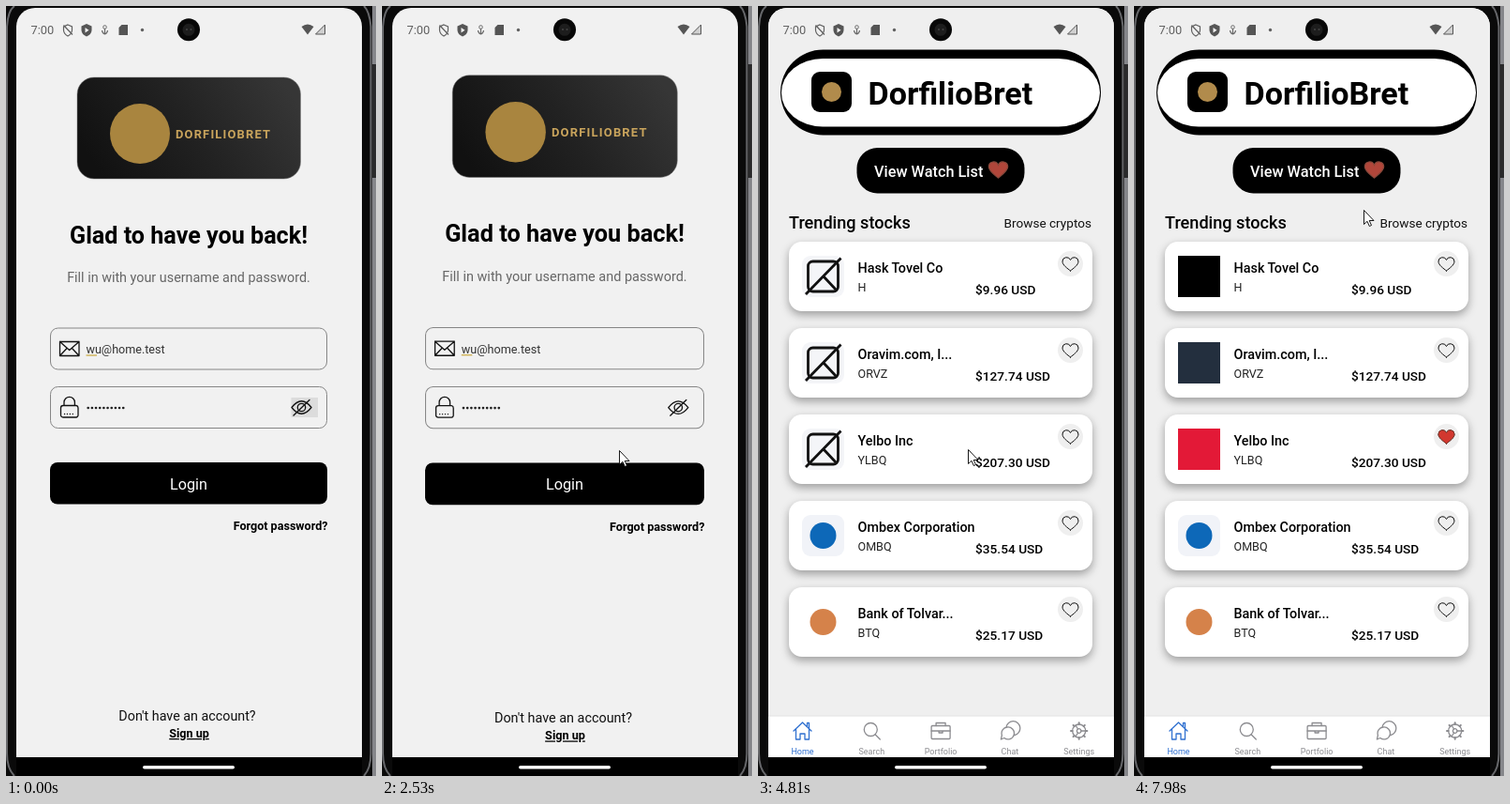
Write an HTML page that moves like this. It is 395 by 820 pixels and loops after 8000 ms.

```html
<!DOCTYPE html>
<html lang="en">
<head>
<meta charset="utf-8">
<style>
html, body { margin: 0; width: 100%; height: 100%; overflow: hidden; background: #0a0a0a; }
svg { display: block; font-family: Roboto, sans-serif; }
.line { fill: none; stroke: #111; stroke-width: 1.3; stroke-linecap: round; stroke-linejoin: round; }
.tab { fill: none; stroke-width: 1.3; stroke-linejoin: round; stroke-linecap: round; }
.card { fill: #fff; filter: drop-shadow(0 4px 5px rgba(0,0,0,.34)); }
</style>
</head>
<body>
<svg id="stage" width="395" height="820" viewBox="0 0 395 820"></svg>
<script>
const text = (x, y, size, str, attrs = '') =>
  `<text x="${x}" y="${y}" font-size="${size}" ${attrs}>${str}</text>`;
const rect = (x, y, w, h, r, fill, attrs = '') =>
  `<rect x="${x}" y="${y}" width="${w}" height="${h}" rx="${r}" fill="${fill}" ${attrs}/>`;
const circle = (x, y, r, fill, attrs = '') =>
  `<circle cx="${x}" cy="${y}" r="${r}" fill="${fill}" ${attrs}/>`;
const path = (d, attrs = 'class="line"') => `<path d="${d}" ${attrs}/>`;
const heart = (x, y, scale, attrs) =>
  path('M0 7C-3 4.5-8.5 1-8.5-3A4.4 4.4 0 0 1 0-4.5A4.4 4.4 0 0 1 8.5-3C8.5 1 3 4.5 0 7Z',
    `transform="translate(${x} ${y}) scale(${scale})" ${attrs}`);
const MIDDLE = 'text-anchor="middle"', END = 'text-anchor="end"';
const BOLD = 'font-weight="700"', MEDIUM = 'font-weight="500"';

const login = `
  ${rect(-20, -20, 440, 860, 0, '#f1f1f1')}
  ${rect(76, 76, 238.5, 108, 18, 'url(#metal)', 'stroke="#777" stroke-width=".5"')}
  ${circle(143, 136, 32, '#a9853f')}
  ${text(181, 140.5, 12.9, 'DORFILIOBRET', `${BOLD} fill="#c9a45c" letter-spacing="1.2"`)}
  ${text(195, 252.5, 25.14, 'Glad to have you back!', `${BOLD} ${MIDDLE}`)}
  ${text(195, 293.5, 14.37, 'Fill in with your username and password.', `${MIDDLE} fill="#666"`)}
  ${rect(47.5, 343, 295, 44, 8, 'none', 'stroke="#868686"')}
  ${rect(47.5, 405.5, 295, 44, 8, 'none', 'stroke="#868686"')}
  ${path('M57.5 357.5H78V372.5H57.5ZL67.7 366.5 78 357.5M57.5 372.5L65 364.5M78 372.5L70.5 364.5')}
  ${text(85.5, 370, 12.57, 'wu@home.test', 'fill="#333"')}
  ${path('M85.5 372H97', 'stroke="#c8a73c" stroke-width="1.2"')}
  ${path('M62 425V422A5.7 5.7 0 0 1 73.4 422V425M61 425.5H75A2.5 2.5 0 0 1 77 428V435A2.5 2.5 0 0 1 75 438H61A2.5 2.5 0 0 1 58.5 435V428A2.5 2.5 0 0 1 61 425.5Z')}
  ${path('M62.5 434.5H74', 'class="line" stroke-dasharray=".1 2.8"')}
  ${Array.from({ length: 10 }, (_, i) => circle(87.7 + i * 4.17, 428, 1.35, '#222')).join('')}
  ${rect(304.5, 417, 28.5, 21, 0, '#dcdcdc', 'id="focus"')}
  ${path('M305 427.5Q315.5 414 326 427.5Q315.5 441 305 427.5ZM307 436L324 419.5')}
  ${circle(315.5, 427.5, 4.2, 'none', 'class="line"')}
  <g id="button">${rect(47, 486, 296, 44.5, 8, '#000')}
  ${text(195, 514.5, 16.16, 'Login', `${MIDDLE} fill="#fff"`)}</g>
  ${text(343.5, 558, 12.57, 'Forgot password?', `${BOLD} ${END}`)}
  ${text(193.5, 761, 14.3, 'Don\'t have an account?', `${MIDDLE} fill="#111"`)}
  ${text(195.5, 779, 12.57, 'Sign up', `${BOLD} ${MIDDLE} text-decoration="underline"`)}`;

// name, ticker, price, logo background, logo dot
const stocks = [
  ['Hask Tovel Co', 'H', 9.96, '#000'],
  ['Oravim.com, I...', 'ORVZ', 127.74, '#232f3e'],
  ['Yelbo Inc', 'YLBQ', 207.3, '#e31937'],
  ['Ombex Corporation', 'OMBQ', 35.54, '#f1f3f8', '#0d68b8'],
  ['Bank of Tolvar...', 'BTQ', 25.17, '#fff', '#d5824a'],
];
const placeholder = rect(47, 266, 45, 44, 9, '#f4f5f8') +
  rect(53.5, 272, 32, 32, 5, 'none', 'stroke="#111" stroke-width="2.8"') +
  path('M51 307L88.5 268.5M70 288L84 303', 'fill="none" stroke="#111" stroke-width="2.8"');

const stockCard = ([name, ticker, price, back, dot], i) => `
  <g transform="translate(0 ${i * 92})">
  ${rect(33, 251, 324, 74, 14, '#fff', 'class="card"')}
  <g class="early">${dot ? rect(47, 266, 45, 44, 9, back) + circle(69.5, 288, 14, dot) : placeholder}</g>
  ${dot ? '' : rect(47, 266, 45, 44, 0, back, 'class="late"')}
  ${text(106.5, 283.5, 14.37, name, MEDIUM)}
  ${text(106.5, 304, 12.57, ticker, 'fill="#222"')}
  ${text(232, 307, 13.7, `$${price.toFixed(2)} USD`, MEDIUM)}
  ${circle(333.5, 274.5, 13.5, '#efefef')}
  ${heart(333.5, 275, 1, 'class="line" style="stroke-width:1"')}
  ${i === 2 ? `<g id="liked">${heart(333.5, 275, 1, 'fill="#d2382f" stroke="#86382c"')}</g>` : ''}
  </g>`;

const gearTeeth = Array.from({ length: 8 }, (_, i) =>
  `<path d="M0-7V-8.7" transform="rotate(${i * 45})" stroke-width="2"/>`).join('');
const tabs = [
  ['Home', '<path d="M-9.5 0L0-9 9.5 0M-7-2V9H-2.5V3H2.5V9H7V-2M5-5V-8.5H7V-3"/>'],
  ['Search', '<circle cx="-1" cy="-1.5" r="7"/><path d="M4 4L9 9"/>'],
  ['Portfolio', '<rect x="-10" y="-5.5" width="20" height="14" rx="1"/><path d="M-10 0H10M-5-5.5V-8.5H5V-5.5M-2 0V2H2V0"/>'],
  ['Chat', '<path d="M-4-4A7.5 7.5 0 1 1 5 4.5M-3-4A6.5 6.5 0 1 1-6 7.5L-9.5 9-8.5 4.5A6.5 6.5 0 0 1-3-4"/>'],
  ['Settings', `<circle r="7"/><circle r="2.3"/><path d="M2.3 0H7M-1.2 2L-3.5 6M-1.2-2L-3.5-6"/>${gearTeeth}`],
];
const tabItem = ([label, icon], i) => {
  const color = i ? '#8c8c90' : '#2f70d0', x = 47.5 + i * 73.8;
  return `<g class="tab" stroke="${color}" transform="translate(${x} 772)">${icon}</g>` +
    text(x, 797, 9, label, `${MIDDLE} fill="${color}"`);
};

const home = `
  ${rect(11, 2, 369, 798, 0, '#efefef')}
  ${rect(24, 46.5, 342, 91, 45.5, '#000')}
  ${rect(25, 56, 340, 72.5, 44, '#fff', 'ry="36"')}
  ${rect(57, 70, 43, 43, 9, '#000')}
  ${circle(78.5, 91.5, 10.5, '#b18b4c')}
  ${text(117.5, 105, 34.1, 'DorfilioBret', BOLD)}
  ${rect(105.5, 151, 179, 48.5, 22, '#000')}
  ${text(124, 181.5, 16.3, 'View Watch List', `fill="#fff" ${MEDIUM}`)}
  ${heart(256.5, 174.7, 1.2, 'fill="#b0463a" stroke="#86483a"')}
  ${text(33, 236.5, 18.1, 'Trending stocks', MEDIUM)}
  ${text(262.5, 235.5, 13.6, 'Browse cryptos', 'fill="#111"')}
  <path id="spinner" fill="none" stroke="#111" stroke-width="2.6"/>
  <g id="list">${stocks.map(stockCard).join('')}</g>
  ${rect(11, 756, 369, 44, 0, '#fff')}
  ${path('M11 756H380', 'stroke="#e2e2e2"')}
  ${tabs.map(tabItem).join('')}`;

const statusBar = `
  ${text(26.5, 30, 12.8, '7:00', 'fill="#606060"')}
  ${path('M66 20L70.5 22V26Q70 30 66 32Q62 30 61.5 26V22ZM61.5 20.5L71 30.5', 'fill="none" stroke="#606060" stroke-width="1.2"')}
  ${path('M86 19L91.5 21.5V26Q91 30.5 86 32.5Q81 30.5 80.5 26V21.5Z', 'fill="#555"')}
  ${path('M84.5 23L88.5 25.7 84.5 28.5Z', 'fill="#f1f1f1"')}
  ${circle(105.5, 22.5, 1.8, 'none', 'stroke="#666"')}
  ${path('M105.5 24V30M102.5 26Q103 29.5 105.5 30Q108 29.5 108.5 26', 'fill="none" stroke="#666" stroke-width="1.2"')}
  ${path('M123.5 20H130V31H120.5V23Z', 'fill="#555"')}
  ${circle(145.5, 25.5, 1.7, '#606060')}
  ${path('M315.5 22Q322 17 328.5 22L322 30.5Z', 'fill="#555"')}
  ${path('M330.5 30L340.5 20V30Z', 'fill="#d0d0d0" stroke="#555"')}
  ${circle(195, 25.3, 12, '#080808')}${circle(195, 25.3, 6.5, '#1d1d1d')}
  ${circle(193, 25, 1, '#444')}${circle(197.5, 25, 1, '#444')}`;

const $ = id => document.getElementById(id);
$('stage').innerHTML = `
  <defs>
    <linearGradient id="metal" x1="0" y1=".6" x2="1" y2=".3">
      <stop stop-color="#111"/><stop offset=".5" stop-color="#222"/><stop offset="1" stop-color="#363636"/>
    </linearGradient>
    <clipPath id="screen"><path d="M11 800V22A20 20 0 0 1 31 2H360A20 20 0 0 1 380 22V800Z"/></clipPath>
  </defs>
  ${rect(0, 0, 395, 820, 0, '#0a0a0a')}
  ${rect(391, 0, 4, 820, 0, '#85868a')}${rect(391, 62, 4, 121, 0, '#2a2a2b')}
  ${path('M9 820Q1 812 1 796V22Q2 5 9 0M382 820Q389.5 812 389.5 796V22Q388 5 382 0', 'fill="none" stroke="#66676a" stroke-width="2"')}
  <g clip-path="url(#screen)"><g id="login">${login}</g><g id="home">${home}</g>${statusBar}</g>
  ${rect(11, 800, 369, 20, 0, '#000')}${rect(146, 809, 98, 3.6, 1.8, '#fff')}
  ${circle(0, 0, 12.3, '#ff0', 'id="tap" opacity=".5"')}
  ${path('M.5.5V15.5L4 12.3 6.3 17.5 8.5 16.5 6.2 11.5H11Z', 'id="cursor" fill="#fff" stroke="#000" stroke-width=".9"')}`;

const LOOP = 8000, OPEN = 2495, LOADED = 4450;
// time, x, y
const route = [
  [230, 318, 822], [500, 235, 600], [780, 120, 434], [1030, 172, 498], [1070, 174, 502],
  [1380, 174, 502], [1700, 253, 473], [3380, 253, 473], [3520, 250, 482], [4300, 250, 482],
  [4760, 224, 472], [5400, 224, 472], [5800, 187, 482], [6280, 339, 460], [6420, 339, 460],
  [6560, 332, 459], [6950, 332, 459], [7450, 325, 527], [7700, 325, 527], [7980, 245, 217],
];
const ramp = (t, from, to) => Math.min(1, Math.max(0, (t - from) / (to - from)));
const smooth = u => u * u * (3 - 2 * u);
const fastOutSlowIn = u => u < 1 / 6 ? .4 * (6 * u) ** 3 : 1 - .6 * (1.2 * (1 - u)) ** 7;
const set = (el, name, value) => el.setAttribute(name, value);
const show = (id, on) => set($(id), 'visibility', on ? 'visible' : 'hidden');
const zoom = (id, s) =>
  set($(id), 'transform', `translate(195.5 410) scale(${s}) translate(-195.5 -410)`);

function pointerAt(t) {
  const i = route.findIndex(p => p[0] > t);
  if (i === 0) return [318, 830];
  if (i < 0) return route.at(-1).slice(1);
  const [a, b] = [route[i - 1], route[i]], u = smooth(ramp(t, a[0], b[0]));
  return [1, 2].map(k => a[k] + (b[k] - a[k]) * u);
}

function spinnerArc(t) {
  const cycles = (t - 3540) / 1333, n = Math.floor(cycles), c = cycles - n;
  const head = 270 * smooth(ramp(c, 0, .5)), tail = 270 * smooth(ramp(c, .5, 1));
  const start = 22 + 216 * cycles + 270 * n + tail, sweep = 48 + head - tail;
  const point = deg => {
    const a = deg * Math.PI / 180;
    return `${195 + 12.3 * Math.cos(a)} ${267 + 12.3 * Math.sin(a)}`;
  };
  return `M${point(start)}A12.3 12.3 0 ${sweep > 180 ? 1 : 0} 1 ${point(start + sweep)}`;
}

function draw(t) {
  const opening = fastOutSlowIn(ramp(t, OPEN, OPEN + 450));
  zoom('login', 1 + .15 * opening);
  zoom('home', .85 + .15 * opening);
  set($('home'), 'opacity', ramp(t, OPEN + 50, OPEN + 133));
  set($('button'), 'opacity', 1 - .8 * (smooth(ramp(t, 1330, 1480)) - smooth(ramp(t, 1480, 1730))));
  show('focus', t < 1240);

  const loaded = t >= LOADED;
  show('spinner', !loaded);
  set($('spinner'), 'd', spinnerArc(t));
  show('list', loaded);
  document.querySelectorAll('.early').forEach(el => set(el, 'opacity', ramp(t, LOADED + 50, LOADED + 300)));
  document.querySelectorAll('.late').forEach((el, i) =>
    set(el, 'opacity', ramp(t, 5040 + i * 100, 5340 + i * 100)));
  set($('liked'), 'opacity', t >= 7000 ? 1 : 0);

  const [x, y] = pointerAt(t);
  set($('cursor'), 'transform', `translate(${x} ${y})`);
  set($('tap'), 'transform', `translate(${x - .5} ${y})`);
  show('tap', (t >= 1240 && t < 1400) || (t >= 6740 && t < 6920));
}

function tick(now) {
  draw(now % LOOP);
  requestAnimationFrame(tick);
}
draw(0);
requestAnimationFrame(tick);
</script>
</body>
</html>
```
